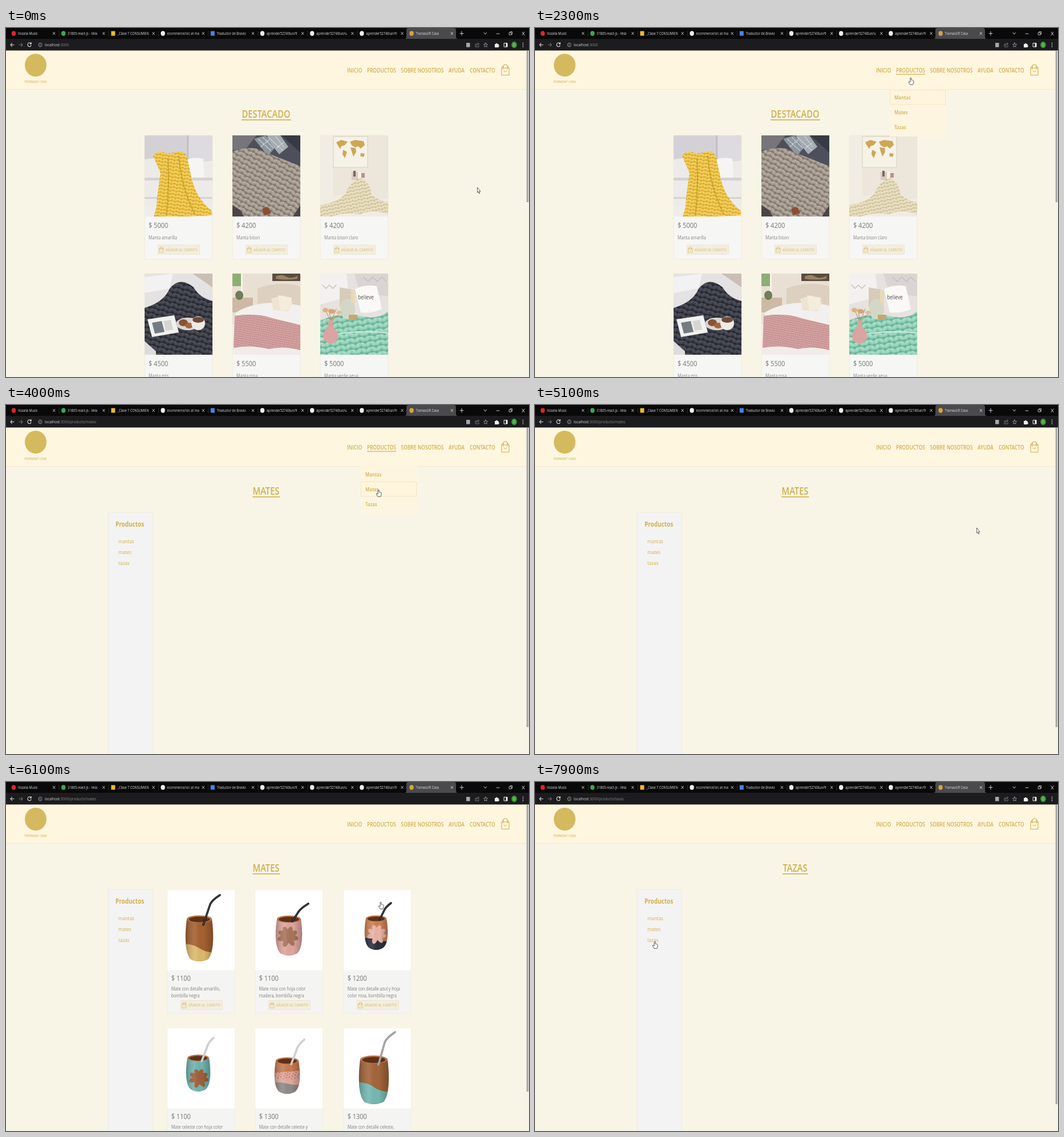
Recreate the animation shown at these times as an HTML page. Size 917 by 611 pixels, loop 8000 ms.

```html
<!DOCTYPE html>
<html lang="es">
<head>
<meta charset="utf-8">
<title>Tienda</title>
<style>
html, body { margin: 0; width: 100%; height: 100%; overflow: hidden; background: #f9f5e6; }
svg { display: block; }
#stage { width: 917px; height: 611px; font-family: "Open Sans", "Noto Sans", sans-serif; }
.b { font-weight: 600; }
.scene { animation: 8s step-end infinite; }
#cursor { animation: move 8s linear infinite; }
@keyframes home { 0% { opacity: 1 } 50%, 100% { opacity: 0 } }
@keyframes shop { 0% { opacity: 0 } 50%, 100% { opacity: 1 } }
@keyframes grid { 0% { opacity: 0 } 75% { opacity: 1 } 97.5%, 100% { opacity: 0 } }
@keyframes mates { 0% { opacity: 0 } 50% { opacity: 1 } 97.5%, 100% { opacity: 0 } }
@keyframes tazas { 0% { opacity: 0 } 97.5%, 100% { opacity: 1 } }
@keyframes menu { 0% { opacity: 0 } 26.25% { opacity: 1 } 56.25%, 100% { opacity: 0 } }
@keyframes row {
  0% { opacity: 0; transform: translateY(-26px) } 28.75% { opacity: 1; transform: translateY(-26px) }
  31.25%, 100% { opacity: 1; transform: none }
}
@keyframes arrow {
  0%, 56.25%, 86.25%, 90%, 93.75% { opacity: 1 }
  26.25%, 75%, 87.5%, 91.25%, 95%, 100% { opacity: 0 }
}
@keyframes hand {
  0%, 56.25%, 86.25%, 90%, 93.75% { opacity: 0 }
  26.25%, 75%, 87.5%, 91.25%, 95%, 100% { opacity: 1 }
}
@keyframes move {
  0% { transform: translate(826px, 279px); animation-timing-function: steps(8) }
  10%, 16.25% { transform: translate(781px, 253px); animation-timing-function: steps(5) }
  22.5% { transform: translate(690px, 128px); animation-timing-function: steps(3) }
  26.25%, 27.5% { transform: translate(660px, 72px); animation-timing-function: steps(5) }
  33.75%, 37.5% { transform: translate(654px, 146px); animation-timing-function: step-end }
  46.25%, 52.5% { transform: translate(653px, 148px); animation-timing-function: steps(3) }
  56.25% { transform: translate(722px, 165px); animation-timing-function: steps(2) }
  58.75% { transform: translate(816px, 195px); animation-timing-function: steps(3) }
  62.5%, 63.75% { transform: translate(774px, 215px); animation-timing-function: steps(4) }
  68.75% { transform: translate(700px, 224px); animation-timing-function: steps(3) }
  72.5% { transform: translate(640px, 215px); animation-timing-function: steps(3) }
  76.25%, 81.25% { transform: translate(657px, 210px); animation-timing-function: steps(3) }
  85% { transform: translate(632px, 220px); animation-timing-function: steps(8) }
  95%, 100% { transform: translate(210px, 279px) }
}
</style>
</head>
<body>
<svg id="stage" viewBox="0 0 917 611"></svg>
<script>
const GOLD = '#d0af4c', PALE = '#dfc984';
const text = (x, y, s, size, fill, attrs = '') =>
  `<text transform="translate(${x} ${y}) scale(.844 1)" font-size="${size}" fill="${fill}" ${attrs}>${s}</text>`;
const rect = (x, y, w, h, fill, attrs = '') =>
  `<rect x="${x}" y="${y}" width="${w}" height="${h}" fill="${fill}" ${attrs}/>`;
const oval = (x, y, rx, ry, fill, attrs = '') =>
  `<ellipse cx="${x}" cy="${y}" rx="${rx}" ry="${ry}" fill="${fill}" ${attrs}/>`;
const path = (d, fill, attrs = '') => `<path d="${d}" fill="${fill}" ${attrs}/>`;
const line = (d, color, w = 1, attrs = '') =>
  path(d, 'none', `stroke="${color}" stroke-width="${w}" stroke-linecap="round" stroke-linejoin="round" ${attrs}`);
const at = (x, y, body, k = 1) => `<g transform="translate(${x} ${y}) scale(${k})">${body}</g>`;
// A part switched on and off by the keyframes of that name.
const scene = (name, body) => `<g class="scene" style="animation-name:${name}">${body}</g>`;
const MID = 'text-anchor="middle"';

// Chunky wool: a tile of two slanted stitches.
const knit = (id, dark, mid, light, k, turn) =>
  `<pattern id="${id}" width="16" height="9" patternUnits="userSpaceOnUse" patternTransform="rotate(${turn}) scale(${k})">` +
  rect(0, 0, 16, 9, dark) +
  oval(4, 4.5, 5, 3.4, mid, 'transform="rotate(35 4 4.5)"') + oval(12, 4.5, 5, 3.4, mid, 'transform="rotate(-35 12 4.5)"') +
  line('M1.5 1.8L6 4.8M14.5 1.8L10 4.8', light, 1.3) + '</pattern>';

const defs = '<defs>' +
  knit('yellow', '#d5a528', '#efc94f', '#f9e18a', .66, 8) +
  knit('taupe', '#81766d', '#aa9f94', '#c2b8ae', .95, 28) +
  knit('cream', '#cfbf94', '#e5dbbd', '#f4eeda', .66, -12) +
  knit('coal', '#262830', '#42444e', '#565963', 1, 15) +
  knit('rose', '#bb8182', '#d2a09f', '#e0b8b5', .42, 10) +
  knit('mint', '#6cb398', '#96d4bb', '#b8e6d4', 1.1, -8) +
  `<linearGradient id="shade"><stop stop-opacity=".22"/><stop offset=".35" stop-color="#fff" stop-opacity=".1"/>
   <stop offset=".65" stop-opacity="0"/><stop offset="1" stop-opacity=".24"/></linearGradient></defs>`;

const bag = line('M1 7h13v12.5H1zM4 9V4.5Q4 1 7.5 1T11 4.5V9M1 7L4 3M14 7L11 3M5 12q2.5 3 5 0', GOLD, 1.1);

function browser() {
  const user = 'aprender52740lun';
  const tabs = [
    ['Vozalia Music', '#e0242c', 1], ['31865-react-js - Vela', '#3fa656', 1], ['_Clase 7 CONSUMIEN', '#f0b92d', 0],
    ['ecommerce/src at ma', '#eee', 1], ['Traductor de Bravio', '#4a83e0', 0], [user + '/fi', '#eee', 1],
    [user + '/u', '#eee', 1], [user + '/fr', '#eee', 1], ['TramasUR Casa', '#d2a63e', 1]];
  let s = rect(0, 0, 917, 19, '#090909') + rect(0, 19, 917, 20.4, '#1c1c1e') +
    path('M699 19q3 0 3-4V4q0-4 4-4h79q4 0 4 4v11q0 4 3 4z', '#4a4a4d');
  tabs.forEach(([name, color, round], i) => {
    const x = 13.5 + 87.2 * i;
    s += round ? oval(x, 9.5, 3.7, 4.2, color) : rect(x - 3.5, 5.5, 7, 8, color);
    s += text(x + 7.5, 12, name, 6.6, '#dedede') + line(`M${x + 69} 7.5l3.4 4m0-4l-3.4 4`, '#ddd', .9);
    if (i < 7) s += line(`M${x + 79.5} 5v9`, '#3b3b3b', .7);
  });
  s += line('M796 9.5h6M799 6v7M838 8l2.3 3 2.3-3M860 10h5M905 7l4 5.5m0-5.5l-4 5.5', '#ddd', .9) +
    line('M882.5 8h3.6v4h-3.6zM884 8V6.5h3.5V11h-1.4', '#ddd', .8) +
    line('M14 29.5H8m2.5-3L8 29.5l2.5 3', '#e4e4e4', 1.1) +
    line('M23 29.5h6m-2.5-3l2.5 3-2.5 3', '#747474', 1.1) +
    line('M43.7 27.3A3.1 3.5 0 1 0 44 30.5M44.2 25.6v2.3H42', '#e4e4e4', 1.1) +
    line('M57 29.5a3 3.5 0 1 0 6 0a3 3.5 0 1 0-6 0M60 29v2.3M60 27.3v.2', '#aaa', .8) +
    rect(807, 26, 6.5, 7.5, '#a7a7a7') +
    line('M826 28h-3v5h6v-3M825 31q0-3 4-3.5m-1.5-1.8l1.8 1.8-1.8 1.8', '#888', .8) +
    line('M841 26l1 2.4 2.5.3-1.9 1.8.6 2.7-2.2-1.4-2.2 1.4.6-2.7-1.9-1.8 2.5-.3z', '#aaa', .8) +
    path('M857 28h2a1.3 1.5 0 0 1 2.6 0h2v2.2a1.2 1.4 0 0 1 0 2.8v1H857z', '#eee') +
    line('M873.5 26.5h5.5v6.5h-5.5z', '#eee', 1) + rect(876.5, 26.5, 2.5, 6.5, '#eee') +
    oval(891, 29.5, 4.8, 5.8, '#3a9a31') + text(891, 32, 'D', 6.5, '#dff0dc', MID);
  for (const y of [26.3, 29.5, 32.7]) s += oval(906.5, y, .8, .9, '#ddd');
  const url = end => text(68, 32.2, `<tspan fill="#d5d5d5">localhost</tspan>:3000${end}`, 7.4, '#858585');
  return s + scene('home', url('')) + scene('mates', url('/products/mates')) + scene('tazas', url('/products/tazas'));
}

function header() {
  const nav = [[598, 'INICIO'], [633, 'PRODUCTOS'], [692.5, 'SOBRE NOSOTROS'], [776, 'AYUDA'], [813, 'CONTACTO']];
  return rect(0, 39, 912, 68, '#fff6e0') + rect(0, 107, 912, 1, '#f4e4cf') +
    oval(52, 65, 19, 20, '#d4b95f') +
    text(52, 96, 'tramasur casa', 8, GOLD, MID + ' font-style="italic" font-family="Liberation Serif, serif"') +
    nav.map(([x, s]) => text(x, 77.6, s, 10, GOLD, 'class="b"')).join('') + at(868, 63, bag);
}

const title = (s, w) => text(456, 156.8, s, 17.4, GOLD, MID + ' class="b"') + rect(456.3 - w / 2, 160, w, 1.6, GOLD);

function button(x, y) {
  return rect(x, y, 73, 16, '#f3eee0', 'stroke="#ebe2c9" stroke-width=".8"') + at(x + 2, y + 2.6, bag, .53) +
    text(x + 13, y + 10.7, 'AÑADIR AL CARRITO', 6.9, PALE, 'class="b"');
}

const photo = (x, y, w, h, body) => `<svg x="${x}" y="${y}" width="${w}" height="${h}">${body}</svg>`;

const blankets = [
  ['5000', 'Manta amarilla',
    rect(0, 0, 119, 142, '#d4d1d6') + rect(78, 0, 41, 60, '#dedbe0') + rect(74, 0, 3, 45, '#c3c0c6') +
    path('M0 42Q40 36 70 42T119 44V142H0z', '#edebea') + path('M75 42q14-5 28-1l2 34H78z', '#f6f5f4') +
    path('M0 74h119v5H0zM0 108h119v3H0z', '#d6d2d0') + rect(0, 124, 119, 18, '#efedea') +
    path('M15 36Q20 27 32 29Q46 34 58 28Q72 27 75 40L83 78Q92 112 118 132V140L76 142H16Q22 126 22 108L28 66z', 'url(#yellow)') +
    line('M41 40Q44 90 38 140M60 36Q64 90 88 138', '#bd9025', 2, 'opacity=".6"')],
  ['4200', 'Manta bison',
    rect(0, 0, 119, 142, '#4d505a') + path('M0 0H42L25 22L0 26z', '#77747a') + path('M86 0h33v30z', '#363a44') +
    path('M38 6L58 0L76 20L62 36z', '#8e979f') + path('M60 0H84L98 20L82 33L70 18z', '#a5adb3') +
    line('M46 7l22 20M54 4l18 18M64 4l24 22M76 2l14 18M50 20l14-12M78 22l12-10', '#d9dde0', 1.2, 'stroke-dasharray="3 2"') +
    path('M0 28Q20 20 42 23L119 54V142H0z', 'url(#taupe)') + path('M0 122l14 9 6 11H0zM119 122l-13 20h13z', '#4b4645') +
    path('M52 130q5-7 12-3l4 9-12 4z', '#8a4e34')],
  ['4200', 'Manta bison claro',
    rect(0, 0, 119, 142, '#ece6db') + rect(0, 0, 22, 142, '#f1ede4') +
    rect(23, 2, 60, 54, '#f6f2e8', 'stroke="#dcd5c5" stroke-width="1.2"') +
    path('M28 12l9-4 11 3-5 6-6 2-2 5-5-8zM40 25l7 4-4 11-4-7zM52 11l9-3 15 2 2 7-7 6-5-4-5 2-6-4zM53 21l9 1 1 7-5 8-3-9zM71 31l7 1-2 6-6-2z', '#cda755') +
    path('M0 112Q40 100 64 108T119 110V142H0z', '#f1ece2') +
    rect(55, 64, 14, 14, '#d9cbbd') + rect(58, 62, 4, 10, '#7c6567') + rect(66, 63, 5, 13, '#f5f1ea') + rect(72, 66, 6, 8, '#c58d85') +
    path('M0 142V122Q30 118 44 102Q56 76 72 75Q88 84 90 104Q104 116 119 117V138Q90 128 70 138Q40 134 20 142z', 'url(#cream)')],
  ['4500', 'Manta gris',
    rect(0, 0, 119, 142, '#e4e2e2') + path('M0 6L50 0L44 26L0 34z', '#f3f2f2') + path('M84 0h35v24z', '#cbbfb5') +
    path('M0 60Q34 50 44 26Q62 4 86 24Q96 42 119 48V142H0z', 'url(#coal)') +
    path('M0 118l20 18v6H0z', '#dedcdb') +
    path('M5 80L52 73L60 103L13 111z', '#f1f1ef') + path('M13 86l17-3 5 19-17 3z', '#747c81') + path('M33 83l13-2 4 17-13 2z', '#d5d6d3') +
    oval(76, 88, 21, 11, '#d8d5d0') + oval(68, 86, 8, 6, '#8b5136') + oval(78, 91, 7, 5, '#a5653e') +
    oval(94, 87, 12, 12, '#eeeae5') + oval(94, 81, 10, 5, '#6f4a38')],
  ['5500', 'Manta rosa',
    rect(0, 0, 119, 142, '#e9e0d4') + rect(0, 0, 15, 22, '#8fae76') + rect(15, 0, 3, 62, '#f6f3ee') +
    rect(70, 0, 49, 13, '#5b4c3f') + path('M76 5q10-5 18 0t20-1v5q-20 3-38 0z', '#9a8266') +
    path('M44 26Q80 12 119 22V62H44z', '#ddd0c0') + rect(0, 42, 36, 26, '#cdb9a4') + oval(12, 38, 7, 8, '#6f7d58') +
    path('M6 68Q50 42 119 56V100L4 90z', '#f2f0ef') +
    path('M68 44l20-6 18 12-8 16-26-2z', '#ede4d1') + path('M80 38l24 4-2 20-18 4z', '#f4ecdc') +
    path('M0 88v54h119v-20z', '#f1ece8') +
    path('M4 74Q40 68 70 78L119 90V134Q90 126 64 132Q30 124 2 130z', 'url(#rose)')],
  ['5000', 'Manta verde agua',
    rect(0, 0, 119, 142, '#e6e2df') + path('M0 0h46l4 40-50 14z', '#f3f1f0') + path('M60 0h59v40l-50-8z', '#dad5d2') +
    line('M76 6l8 8 8-8 8 8 8-8 8 8M4 20l6 6 6-6 6 6 6-6', '#c2bab5', 1.2) +
    path('M34 24l22 4-4 36-18-6z', '#d8cbb8') + path('M61 27Q80 18 99 22L108 62Q90 70 71 68z', '#faf9f8') +
    text(80, 45, 'believe', 10, '#54504f', MID) +
    path('M0 82Q40 66 70 74T119 66V142H0z', 'url(#mint)') + line('M0 116Q40 96 119 104', '#cdebe0', 2) +
    oval(48, 62, 13, 18, '#d3d8c6') + rect(54, 28, 7, 24, '#e9d9b5') + rect(50, 72, 15, 9, '#c9a66f') +
    line('M18 84L8 60M18 84L16 62M19 84L28 62M20 84L36 68', '#c08c55', 1) +
    oval(9, 64, 5, 4, '#dfb27e') + oval(20, 66, 6, 4, '#d6a57a') + oval(33, 68, 5, 3, '#e4bc90') +
    path('M14 82h9l-1 12q11 7 9 18-4 11-13 10-12-1-13-12 1-10 9-16z', '#dba3a1')]];

const home = title('DESTACADO', 87) + blankets.map(([price, name, art], i) => {
  const x = 243 + 154 * (i % 3), y = i < 3 ? 188 : 430;
  return rect(x, y, 119, 217, '#f6f6f5', 'stroke="#eeeadd" rx="2"') + photo(x, y, 119, 142, art) +
    text(x + 7, y + 162, '$ ' + price, 13, '#757575') + text(x + 7, y + 182, name, 8.45, '#858585') + button(x + 23.5, y + 192);
}).join('');

const leaf = (x, y, k, color) => at(x, y, [0, 40, 80, 125, 180, 235, 280, 320]
  .map(a => oval(0, -8, 3.7, 7, color, `transform="rotate(${a + 20})"`)).join('') + oval(0, 0, 9, 9, color), k);

// Gourd seen slightly from above; x, y is the middle of its rim.
function mate(x, y, r, h, wood, straw, metal, art) {
  const b = y + h, id = `cup${x}-${y}`;
  const side = s => `${x + s * (r + 4)} ${y + h * .4} ${x + s * (r + 3)} ${b - h * .2}`;
  const body = `M${x - r} ${y}C${side(-1)} ${x - r * .7} ${b - 4}Q${x} ${b + 4} ${x + r * .7} ${b - 4}` +
    `C${x + r + 3} ${b - h * .2} ${x + r + 4} ${y + h * .4} ${x + r} ${y}z`;
  return `<clipPath id="${id}">${path(body, '#000')}</clipPath>` +
    path(body, wood) + `<g clip-path="url(#${id})">${art}</g>` + path(body, 'url(#shade)') +
    oval(x, y, r, r * .3, '#b87345') + oval(x, y + .6, r * .84, r * .22, '#5d3018') +
    line(straw, metal, 3.6) + line(straw, '#fff', .8, 'opacity=".35"');
}

const band = (x, y, dy, color) => path(`M${x - 40} ${y - dy}Q${x - 14} ${y - dy - 3} ${x} ${y}T${x + 40} ${y + dy}V${y + 60}H${x - 40}z`, color);
let dots = '';
for (let i = 0; i < 34; i++) dots += oval(472 + i * 17.3 % 44, 503 + i * 7.7 % 17, 1, 1, '#b96a48');

const cups = [
  ['1100', ['Mate con detalle amarillo,', 'bombilla negra'],
    mate(339, 240, 22, 74, '#a4612f', 'M346 250L358 214Q361 207 375 198', '#1d1c1e', band(339, 291, 7, '#ddb96d'))],
  ['1100', ['Mate rosa con hoja color', 'madera, bombilla negra'],
    mate(496, 240, 21, 64, '#dea59e', 'M502 244L513 227Q517 221 530 213', '#1d1c1e', leaf(494, 271, 1.25, '#a8745b'))],
  ['1200', ['Mate con detalle azul y hoja', 'color rosa, bombilla negra'],
    mate(649, 239, 18, 55, '#cb8157', 'M655 241L664 223Q667 218 675 212', '#1d1c1e', band(649, 276, 2, '#2b303d') + leaf(650, 267, 1.15, '#e8b3a4'))],
  ['1100', ['Mate celeste con hoja color', 'madera, bombilla plateada'],
    mate(337, 483, 19, 59, '#70b3b0', 'M343 489L354 460Q357 454 364 448', '#c9cacb', leaf(338, 519, 1.15, '#9f6039'))],
  ['1300', ['Mate con detalle celeste y', 'rosa, bombilla plateada'],
    mate(493, 488, 20, 58, '#c87b4f', 'M500 494L511 465Q514 459 523 451', '#c9cacb', band(493, 507, -4, '#e2a99d') + dots + band(493, 528, 1, '#8d8b89'))],
  ['1300', ['Mate con detalle celeste,', 'bombilla plateada'],
    mate(645, 486, 24, 78, '#a2653a', 'M653 495L664 456Q667 448 682 438', '#98999b', band(645, 534, 8, '#74b8b2'))]];

const grid = cups.map(([price, lines, art], i) => {
  const x = [283, 437, 592][i % 3], y = i < 3 ? 189 : 431;
  return rect(x, y, 118, 216, '#f4f4f3', 'stroke="#eeeadd" stroke-width=".8"') + rect(x, y, 118, 140.5, '#fff') + art +
    text(x + 6.7, y + 159.3, '$ ' + price, 13, '#757575') +
    lines.map((s, n) => text(x + 6.7, y + 175.5 + 12 * n, s, 8.45, '#808080')).join('') + button(x + 23.5, y + 193.5);
}).join('');

const side = rect(179, 188, 78, 440, '#f4f3f3', 'stroke="#f0eadb"') + text(192, 213, 'Productos', 11.8, GOLD, 'font-weight="700"') +
  ['mantas', 'mates', 'tazas'].map((s, i) => text(197, 241.5 + 19.3 * i, s, 9.5, GOLD)).join('');

const menu = rect(633, 80.5, 51, 1.2, GOLD) + rect(622, 106, 99, 84, '#fdf5df') +
  scene('row', rect(622.5, 134.5, 97, 25.5, '#fef5dc', 'stroke="#f2e5c4"')) +
  ['Mantas', 'Mates', 'Tazas'].map((s, i) => text(630, 124.8 + 26 * i, s, 9.4, GOLD, 'class="b"')).join('');

const track = (y, h) => rect(912, y, 5, h, '#f6f3e9');
const thumb = h => rect(912.6, 40, 3.6, h, '#ababab');
const edge = 'stroke="#333" stroke-width=".8" stroke-linejoin="round"';
const cursor =
  scene('arrow', path('M.4 0V9.2L2.2 7.5L3.5 10.8L4.9 10.2L3.6 7H6z', '#fff', edge)) +
  scene('hand', path('M-.9 1Q0-.6 1 1V4.4Q2 3.7 2.6 4.8Q3.5 4.2 4 5.2Q5 4.9 5 6.2V9L4 12.3H-1.2L-3.6 8Q-3.6 6.4-2.2 7L-.9 8z', '#fff', edge));

document.getElementById('stage').innerHTML = defs + rect(0, 0, 917, 611, '#f9f5e6') + track(39, 572) +
  scene('home', home + thumb(265)) +
  scene('shop', side + thumb(524)) +
  scene('mates', title('MATES', 48)) +
  scene('tazas', title('TAZAS', 45)) +
  scene('grid', grid + track(542, 24)) +
  header() + scene('menu', menu) + browser() + `<g id="cursor">${cursor}</g>`;
</script>
</body>
</html>
```
